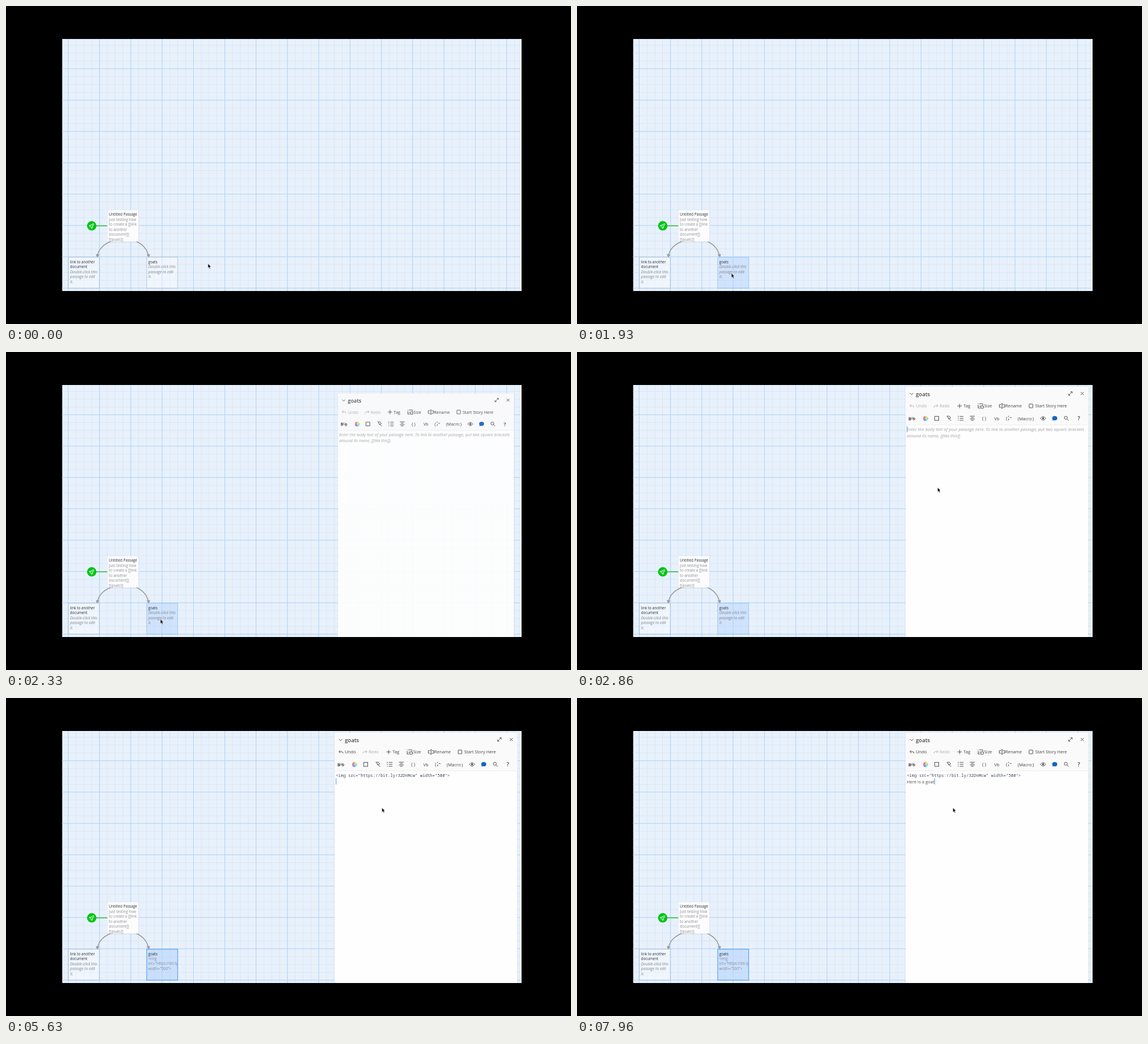
An HTML page for the animation above (8000 ms loop, 960 by 540 pixels).

```html
<!DOCTYPE html>
<html lang="en">
<head>
<meta charset="utf-8">
<title>Editing a passage</title>
<style>
  html, body { margin: 0; width: 100%; height: 100%; overflow: hidden; background: #000; }
  svg { display: block; }
  text { font: 6.3px "Open Sans", "Noto Sans", sans-serif; fill: #8d8f93; white-space: pre; }
  .name { font-size: 6.2px; fill: #2e3136; }
  .hint { font-size: 6.45px; font-style: italic; fill: #85898f; }
  .tool text { font-size: 7.3px; fill: #444; }
  .tool text.title { font-size: 9.1px; font-weight: 600; }
  #placeholder text { font-size: 7.4px; font-style: italic; fill: #a2a2a2; }
  #code { font: 7.03px "Noto Sans Mono", "DejaVu Sans Mono", monospace; fill: #414a60; }
  #typed { font-size: 7.35px; fill: #555; }
  .icon { fill: none; stroke: #444; stroke-width: .9; }
  .card { fill: #fff; fill-opacity: .35; stroke: #8f9aa8; stroke-width: .7; stroke-dasharray: 1.5 1; }
  #goats.selected .card { fill: #b9d6fd; fill-opacity: .5; stroke: #62a5ec; }
  #goats.filled .card { fill-opacity: .65; stroke: #4c9cf0; stroke-width: 1; stroke-dasharray: none; }
  #excerpt, #goats.filled .empty { display: none; }
  #goats.filled #excerpt { display: inline; }
  .off { opacity: .42; }
</style>
</head>
<body>
<svg width="960" height="540" viewBox="0 0 960 540">
  <rect width="960" height="540"/>
  <svg x="95.5" y="56" width="780.5" height="428" viewBox="95.5 56 780.5 428">
    <rect x="95" y="56" width="782" height="428" fill="#e8f1fb"/>
    <path id="minor" stroke="#d7e6f6" stroke-width=".9"/>
    <path id="major" stroke="#b3d5f7"/>
    <rect x="874.6" y="56" width="2" height="428" fill="#fcfdff"/>

    <g fill="none" stroke="#999" stroke-width="1.4">
      <path d="M180 399Q159 407 155.7 423M220 399Q238 407 241.8 423"/>
      <path d="M152.6 421.3l6 .9-3.8 5zM238.9 422.2l5.9-1-1.9 5.9z" fill="#999" stroke="none"/>
    </g>
    <path d="M153 373.4h20" stroke="#22b830" stroke-width="1.3"/>
    <circle cx="145.7" cy="373.3" r="8" fill="#00c314"/>
    <g transform="translate(145.7 373.3) rotate(45)" fill="none" stroke="#fff" stroke-width=".8">
      <path d="M-1.7 2.2V-1.2Q-1.5-3.6 0-4.8 1.5-3.6 1.7-1.2V2.2zM-1.7 0L-3.3 1.7V3.3L-1.7 2.2M1.7 0L3.3 1.7V3.3L1.7 2.2M0 2.8V4.6"/>
      <circle cy="-1.3" r=".5"/>
    </g>

    <rect x="172" y="347.2" width="54" height="54" rx="1" fill="#788" opacity=".18"/>
    <rect x="172.3" y="346.8" width="53" height="53.2" rx="1" fill="#fcfcfd"/>
    <text class="name" x="174.8" y="356">Untitled Passage</text>
    <svg x="172" y="357" width="53" height="43.2" viewBox="172 357 53 43.2">
      <text x="174.8" y="364.8">Just testing how</text>
      <text x="174.8" y="373.3">to create a [[link</text>
      <text x="174.8" y="381.9">to another</text>
      <text x="174.8" y="390.4">document]]</text>
      <text x="174.8" y="399">[[goats]]</text>
    </svg>

    <rect class="card" x="106" y="426.6" width="52.5" height="52.6"/>
    <text class="name" x="108.8" y="436.8">link to another</text>
    <text class="name" x="108.8" y="445.3">document</text>
    <text class="hint" x="108.8" y="453.9">Double-click this</text>
    <text class="hint" x="108.8" y="462.4">passage to edit</text>
    <text class="hint" x="108.8" y="471">it.</text>

    <g id="goats">
      <rect class="card" x="239.1" y="426.6" width="52.6" height="52.6"/>
      <text class="name" x="241.8" y="436.8">goats</text>
      <g class="empty">
        <text class="hint" x="241.8" y="445.3">Double-click this</text>
        <text class="hint" x="241.8" y="453.9">passage to edit</text>
        <text class="hint" x="241.8" y="462.4">it.</text>
      </g>
      <svg id="excerpt" x="239" y="437" width="52.4" height="40" viewBox="239 437 52.4 40">
        <text x="241.4" y="444.6">&lt;img</text>
        <text x="241.4" y="453.1">src="https://bit.ly/32DnMcw"</text>
        <text x="241.4" y="461.7">width="500"&gt;</text>
      </svg>
    </g>

    <g id="panel">
      <rect x="557.6" y="58.6" width="311.8" height="632" fill="#567" opacity=".1"/>
      <rect x="558.2" y="59" width="310.4" height="631" fill="#fefefe"/>
      <rect x="558.2" y="59" width="310.4" height="65" fill="#fafafb"/>
      <path d="M558.2 123.8h310.4" stroke="#ebebed" stroke-width=".8"/>
      <g class="tool">
        <path class="icon" d="M565.7 69.7l2.8 2.8 2.8-2.8M855.9 68l5 5m0-5l-5 5" stroke-width="1.1"/>
        <path class="icon" d="M835.4 73.4l5.9-5.9m-2.7 0h2.7v2.7M835.4 70.8v2.6h2.7"/>
        <text class="title" x="575.8" y="74.6">goats</text>

        <g id="undo">
          <path class="icon" d="M568 88.8l-2.4 2.4 2.4 2.4M565.8 91.2h4.8q2 .1 2 2.8"/>
          <text x="575.8" y="94.4">Undo</text>
        </g>
        <g class="off">
          <path class="icon" d="M611 88.8l2.4 2.4-2.4 2.4M613.2 91.2h-4.8q-2 .1-2 2.8"/>
          <text x="616" y="94.4">Redo</text>
        </g>
        <path class="icon" d="M646.4 91.6h7.4M650.1 87.9v7.4"/>
        <text x="656.8" y="94.4">Tag</text>
        <path class="icon" d="M683.4 88h6.2v2.2M681.6 90v5.2h3.2M681.2 88h.9M686 91.5h4.5v3.8H686zM683 93.2l2-2"/>
        <text x="691.8" y="94.4">Size</text>
        <path class="icon" d="M720.5 89.4h-3v4.4h3M723.8 89.4h3v4.4h-3M722.2 88v7.3M720.8 87.9h2.8M720.8 95.3h2.8"/>
        <text x="727.8" y="94.4">Rename</text>
        <rect class="icon" x="768.2" y="88.3" width="6.3" height="6.5" rx=".8"/>
        <text x="778.4" y="94.4">Start Story Here</text>

        <text x="563" y="115.6" style="font-weight:700">B</text>
        <text x="567" y="115" style="font-style:italic">/</text>
        <text x="570.2" y="116.4" style="font-weight:600">S</text>
        <path class="icon" d="M568.8 113.4h6.3" stroke-width=".7"/>
        <g id="wheel" transform="translate(592.3 112.9)"></g>
        <rect class="icon" x="607.8" y="109.3" width="6.8" height="6.8"/>
        <path class="icon" d="M628.2 109h4.6l2 3-3 1.3-2.8-4M630.5 112.5l5.3 4"/>
        <path class="icon" d="M650.4 109.4h6.2M650.4 112.7h6.2M650.4 116h6.2M647.9 108.3v2.2M647.2 112.7h1.4M647.2 116h1.4"/>
        <path class="icon" d="M667.6 109h8.2M669.4 111.3h4.6M667.6 113.7h8.2M669.4 116h4.6"/>
        <text x="688" y="115.4">{ }</text>
        <text x="709" y="115.6">Vb</text>
        <text x="728.4" y="115.2">{</text>
        <path class="icon" d="M733.4 108.4v2M735.4 111.4h3M733.4 113v3"/>
        <text x="748.8" y="115.5">(Macro:)</text>
        <path class="icon" d="M787.4 112.7q4.5-6 9 0-4.5 6-9 0z"/>
        <circle cx="791.9" cy="112.7" r="1.6" fill="#444"/>
        <path d="M807.4 112.4a4.3 3.6 0 1 1 4.3 3.6q-1.6 0-2-.2-.8.8-2.2.8.9-1 .8-1.8-.9-1-.9-2.4z" fill="#1565c0"/>
        <circle class="icon" cx="830.6" cy="111.7" r="2.6" stroke-width="1.2"/>
        <path class="icon" d="M832.5 113.6l3 3" stroke-width="1.3"/>
        <text x="850.6" y="116.4" style="font-size:9.5px;font-weight:600">?</text>
      </g>
      <g id="placeholder">
        <text x="560.3" y="134.3">Enter the body text of your passage here. To link to another passage, put two square brackets</text>
        <text x="560.3" y="144.9">around its name, [[like this]].</text>
      </g>
      <text id="code" x="560.4" y="134.3">&lt;img src="https://bit.ly/32DnMcw" width="500"&gt;</text>
      <text id="typed" x="560.4" y="144.9"></text>
      <rect id="caret" width="1.1" height="10.4" fill="#5ba0ee"/>
    </g>
    <path id="pointer" d="M0 0V7.4L1.7 5.9 2.9 8.7 4.2 8.1 3 5.4H5.2z" stroke="#fff" stroke-width=".5"/>
  </svg>
</svg>
<script>
const $ = id => document.getElementById(id);
const LOOP = 8000, FRAME = 100 / 3;
const TEXT = 'Here is a goat';
const KEYS = [6060, 6200, 6300, 6430, 6530, 6630, 6730, 6860, 6960, 7100, 7200, 7300, 7530, 7960];
// [time, x, y] of the pointer tip
const PATH = [[700, 343.2, 437.6], [1060, 291.6, 450], [1260, 273, 458], [1500, 262.4, 453.8],
  [2460, 262.4, 453.8], [2860, 612.8, 230.2], [3030, 650, 203], [3330, 638.8, 186.4]];
// [from, to] spans in which the caret is lit
const LIT = [[2660, 3160], [3660, 4160], [4300, 4760], [5300, LOOP]];

function grid(step) {
  let d = '';
  for (let x = 105.6 - 53.2; x < 877; x += step) d += `M${x} 56V484`;
  for (let y = 106.6 - 53.25; y < 485; y += step) d += `M95 ${y}H874.6`;
  return d;
}
$('minor').setAttribute('d', grid(53.22 / 4));
$('major').setAttribute('d', grid(53.22));

const rim = deg => `${4.3 * Math.cos(deg * Math.PI / 180)} ${4.3 * Math.sin(deg * Math.PI / 180)}`;
for (let a = 0; a < 360; a += 30)
  $('wheel').innerHTML += `<path d="M0 0L${rim(a - 16)}A4.3 4.3 0 0 1 ${rim(a + 16)}z" fill="hsl(${a + 120} 85% 68%)"/>`;

function pointerAt(t) {
  const i = PATH.findIndex(p => p[0] > t);
  if (i === 0) return PATH[0].slice(1);
  if (i < 0) return PATH.at(-1).slice(1);
  const [a, b] = [PATH[i - 1], PATH[i]], u = (t - a[0]) / (b[0] - a[0]);
  return [a[1] + (b[1] - a[1]) * u, a[2] + (b[2] - a[2]) * u];
}

const show = (id, on) => $(id).setAttribute('visibility', on ? 'inherit' : 'hidden');

function draw(now) {
  const t = Math.floor(Math.floor((now % LOOP + 7) / FRAME) * FRAME / 10 + .001) * 10;

  $('pointer').setAttribute('transform', `translate(${pointerAt(t)})`);
  $('goats').setAttribute('class', (t >= 1930 ? 'selected' : '') + (t >= 5300 ? ' filled' : ''));

  const u = Math.min(Math.max((t - 2191) / 200, 0), 1);
  const open = 1 - (1 - u) ** 2.2, scale = .5 + open / 2;
  show('panel', t >= 2230);
  $('panel').setAttribute('opacity', open);
  $('panel').setAttribute('transform', `translate(713.5 374) scale(${scale}) translate(-713.5 -374)`);
  $('undo').setAttribute('class', t < 5300 ? 'off' : '');

  const pasted = t >= 4300, secondLine = t >= 5630;
  show('placeholder', !pasted);
  show('code', pasted);
  $('typed').textContent = TEXT.slice(0, KEYS.filter(k => k <= t).length);
  const width = secondLine ? $('typed').getComputedTextLength() : pasted ? 194 : 0;
  $('caret').setAttribute('x', 560.3 + width);
  $('caret').setAttribute('y', secondLine ? 136.4 : 126);
  show('caret', LIT.some(([from, to]) => t >= from && t < to));
}

function tick() {
  draw(performance.now());
  requestAnimationFrame(tick);
}
tick();
</script>
</body>
</html>
```
